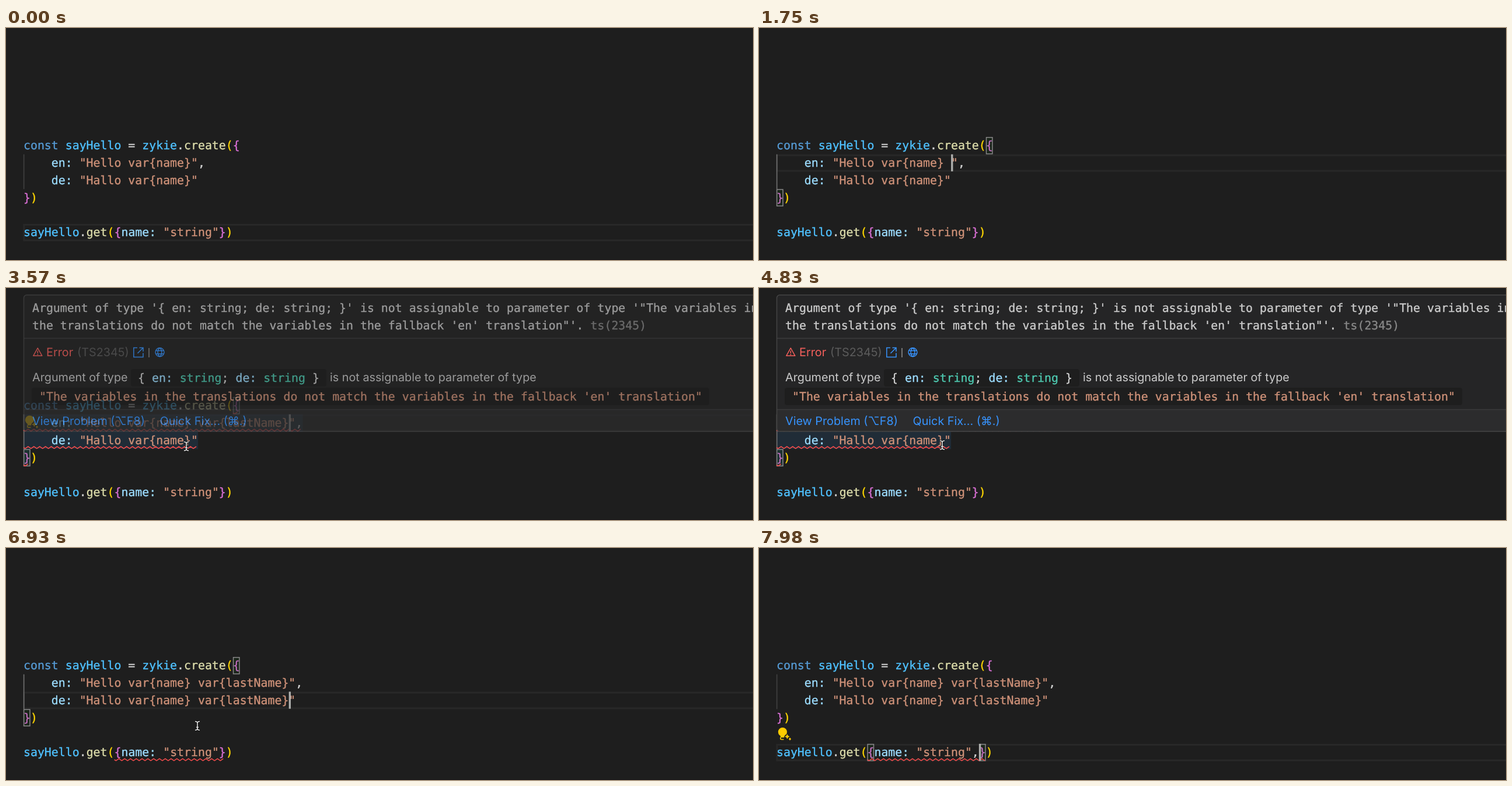
Recreate the animation shown at these times as an HTML page. Size 1280 by 398 pixels, loop 8000 ms.

```html
<!DOCTYPE html>
<html lang="en">
<head>
<meta charset="utf-8">
<title>Typed translations</title>
<style>
  html, body { margin: 0; width: 100%; height: 100%; overflow: hidden; background: #1e1e1e; }
  svg { display: block; width: 1280px; height: 398px; }
  text { white-space: pre; text-rendering: geometricPrecision; }
  .mono { font: 19.875px "DejaVu Sans Mono", monospace; stroke-width: 0.35px; }
  .sans { font: 19.8px Inter, sans-serif; stroke-width: 0; }
</style>
</head>
<body>
<svg id="stage" viewBox="0 0 1280 398"></svg>
<script>
const LOOP = 8000, STEP = 70, BLINK = 490;
const LEFT = 30, TOP = 186.9, CHAR = 11.965, LINE = 29.8, PX = 1.656;
const C = {
  keyword: '#569cd6', name: '#4fc1ff', plain: '#d4d4d4', call: '#dcdcaa', paren: '#ffd700',
  brace: '#da70d6', key: '#9cdcfe', string: '#ce9178', type: '#4ec9b0', soft: '#cccccc',
  error: '#f14c4c', link: '#3794ff', bulb: '#ffcc00'
};
const LAST = ' var{lastName}';

// [time, line, column]
const carets = [
  [840, 1, 24], [1750, 1, 25], [2520, 1, 38], [5320, 2, 24],
  [5880, 2, 25], [5950, 2, 38], [7420, 5, 28], [7980, 5, 29]
];
// pointer paths of [time, x, y]; each is visible from its first time until "end"
const pointers = [
  { end: 1400, path: [[70, 436, 350], [420, 385, 290], [770, 324, 238], [910, 324, 238], [1050, 349, 246]] },
  { end: 4830, path: [[2940, 334, 262], [3220, 309, 271.5]] },
  { end: 5880, path: [[4830, 314, 269.5], [5180, 322, 265]] },
  { end: 7980, path: [[6440, 296, 268], [6580, 296, 268], [6930, 328, 305], [7350, 366, 351.5]] }
];

const colX = col => LEFT + col * CHAR;
const lineY = line => TOP + line * LINE;
const within = (t, from, to) => t >= from && t < to;

const rect = (x, y, w, h, fill, extra = '') =>
  `<rect x="${x}" y="${y}" width="${w}" height="${h}" fill="${fill}" ${extra}/>`;
const path = (d, stroke, width = PX, extra = '') =>
  `<path d="${d}" fill="none" stroke="${stroke}" stroke-width="${width}" ${extra}/>`;

// parts: colour, text, colour, text ...
function text(x, y, parts, font = 'mono') {
  let spans = '';
  for (let i = 0; i < parts.length; i += 2)
    spans += `<tspan fill="${parts[i]}" stroke="${parts[i]}">${parts[i + 1]}</tspan>`;
  return `<text class="${font}" x="${x}" y="${y}">${spans}</text>`;
}

const codeLine = (line, ...parts) => text(LEFT, lineY(line) + 21.4, parts);

function squiggle(line, from, to) {
  const x0 = colX(from), x1 = colX(to), low = lineY(line) + LINE - 0.9, high = low - 3.4;
  let d = `M${x0} ${(low + high) / 2}`;
  for (let i = 0, x = x0 + 1.75 * PX; x <= x1; i++, x += 3 * PX) d += `L${x} ${i % 2 ? high : low}`;
  return path(d, C.error, 1.6);
}

const shade = (line, from, to) =>
  rect(colX(from), lineY(line), (to - from) * CHAR, LINE, 'rgba(38,79,120,.28)');

const bracketBox = (line, col) =>
  rect(colX(col) + 0.6, lineY(line) + 0.8, CHAR - 1.6, LINE - 1.6, 'rgba(0,100,0,.1)',
    'stroke="#888888" stroke-width="1.5"');

function star(x, y, r) {
  const k = r * 0.28;
  return `<path fill="${C.bulb}" d="M${x} ${y - r}L${x + k} ${y - k}L${x + r} ${y}L${x + k} ${y + k}` +
    `L${x} ${y + r}L${x - k} ${y + k}L${x - r} ${y}L${x - k} ${y - k}Z" stroke="${C.bulb}" ` +
    `stroke-width="1" stroke-linejoin="round"/>`;
}

const sparkles = line => star(40, lineY(line) + 10.5, 8.5) + star(50, lineY(line) + 19.5, 4.5);

function bulb(line) {
  const y = lineY(line);
  return `<circle cx="40.4" cy="${y + 9.6}" r="7.6" fill="${C.bulb}"/>` +
    rect(36.8, y + 14, 6.6, 5, C.bulb) +
    path(`M36.8 ${y + 19}v2q0 1.4 1.6 1.4h4`, C.bulb) +
    `<circle cx="49" cy="${y + 18.6}" r="5.6" fill="#1e1e1e"/>` +
    star(48.4, y + 17.4, 3.6) + star(53, y + 21.6, 2);
}

function codeView(t, caret) {
  const line = caret ? caret[1] : 5;
  const inBlock = line < 3;
  const enTail = t < 1750 ? '' : t < 2520 ? ' ' : LAST;
  const deTail = t < 5880 ? '' : t < 5950 ? ' ' : LAST;
  const comma = t >= 7980 ? ',' : '';
  const enEnd = 26 + enTail.length, deEnd = 25 + deTail.length, argEnd = 29 + comma.length;
  const blockRanges = [[0, 30, 31], [1, 0, enEnd], [2, 0, deEnd], [3, 0, 1]];
  const argRange = [5, 13, argEnd];
  const draw = (ranges, shape) => ranges.map(r => shape(...r)).join('');

  let out = rect(LEFT + 0.8, lineY(line) + 1.6, 1260, LINE - 3, 'none', 'stroke="#282828" stroke-width="3"');
  if (within(t, 3570, 5110)) out += draw(blockRanges, shade);
  if (within(t, 7700, 7980)) out += draw([argRange], shade);
  out += rect(29.8, lineY(1), PX, LINE * 2, inBlock ? '#707070' : '#404040');

  out += codeLine(0, C.keyword, 'const ', C.name, 'sayHello', C.plain, ' = ', C.name, 'zykie',
    C.plain, '.', C.call, 'create', C.paren, '(', C.brace, '{');
  out += codeLine(1, C.key, '    en: ', C.string, `"Hello var{name}${enTail}"`, C.plain, ',');
  out += codeLine(2, C.key, '    de: ', C.string, `"Hallo var{name}${deTail}"`);
  out += codeLine(3, C.brace, '}', C.paren, ')');
  out += codeLine(5, C.name, 'sayHello', C.plain, '.', C.call, 'get', C.paren, '(', C.brace, '{',
    C.key, 'name: ', C.string, '"string"', C.plain, comma, C.brace, '}', C.paren, ')');

  if (caret) out += draw(inBlock ? [[0, 30], [3, 0]] : [[5, 13], [5, argEnd - 1]], bracketBox);
  if (within(t, 2870, 6300)) out += draw(blockRanges, squiggle);
  if (t >= 6300) out += draw([argRange], squiggle);

  if (within(t, 2870, 5320)) out += bulb(1);
  if (within(t, 5600, 6300)) out += sparkles(2);
  if (t >= 7700) out += bulb(4);

  if (caret && (t - caret[0]) % (2 * BLINK) < BLINK)
    out += rect(colX(caret[2]), lineY(line), 2 * PX, LINE - 0.6, '#aeafad');
  return out;
}

function hover(opacity) {
  const message = '"The variables in the translations do not match the variables in the fallback \'en\' translation"';
  const split = message.indexOf(' the translations');
  const dim = '#5c5c5c', grey = '#888888';
  return `<g opacity="${opacity}">` +
    rect(30.5, 12, 1300, 234, '#252526', 'rx="5"') +
    rect(31, 208.5, 1300, 37, '#2c2c2d') +
    path('M30 86.3H1280M30 208.5H1280', '#3a3a3b') +
    rect(30.5, 12, 1300, 234, 'none', 'rx="5" stroke="#454545" stroke-width="1.5"') +
    text(45, 41, [C.soft, `Argument of type '{ en: string; de: string; }' is not assignable to parameter of type '${message.slice(0, split)}`]) +
    text(45, 71, [C.soft, message.slice(split + 1) + "'. ", grey, 'ts(2345)']) +
    path('M54.3 103L61.8 116.3H46.8ZM54.3 107.5V112M54.3 113.2V115', '#f7605c', 1.5, 'stroke-linejoin="round"') +
    text(69, 117, ['#f7605c', 'Error'], 'sans') +
    text(122, 117, [dim, '(TS2345)'], 'sans') +
    path('M225 102.5H218.8V118.5H235V111.5M228.5 102.5H235V109M235 102.5L225.5 112', C.link, 1.5) +
    path('M245 103V119', grey) +
    path('M256 110.2a7.5 7.5 0 1 0 15 0a7.5 7.5 0 1 0 -15 0M263.5 102.7c-4.5 4-4.5 11 0 15c4.5-4 4.5-11 0-15M256.8 107.5H270.2M256.8 113H270.2', C.link, 1.4) +
    text(45, 160, [C.soft, 'Argument of type'], 'sans') +
    rect(214, 139, 335, 30, '#1e1e1e', 'rx="4"') +
    text(226, 161, [C.plain, '{ ', C.key, 'en: ', C.type, 'string', C.plain, '; ', C.key, 'de: ',
      C.type, 'string', C.plain, ' }']) +
    text(555, 160, [C.soft, 'is not assignable to parameter of type'], 'sans') +
    rect(44, 171, 1161, 30, '#1e1e1e', 'rx="4"') +
    text(57, 193, [C.string, message]) +
    text(45, 235, [C.link, 'View Problem (⌥F8)'], 'sans') +
    text(263.5, 235, [C.link, 'Quick Fix... (⌘.)'], 'sans') +
    '</g>';
}

function hoverOpacity(t) {
  if (!within(t, 3570, 5110)) return 0;
  return Math.min(1, 0.72 + (t - 3570) / 210 * 0.28);
}

function pointer(t) {
  const move = pointers.find(p => within(t, p.path[0][0], p.end));
  if (!move) return '';
  const next = move.path.findIndex(p => p[0] > t);
  let [, x, y] = move.path[move.path.length - 1];
  if (next > 0) {
    const a = move.path[next - 1], b = move.path[next], k = (t - a[0]) / (b[0] - a[0]);
    x = a[1] + (b[1] - a[1]) * k;
    y = a[2] + (b[2] - a[2]) * k;
  }
  const beam = `M${x - 4} ${y - 7.5}q4 0 4 3v9q0 3-4 3M${x + 4} ${y - 7.5}q-4 0-4 3v9q0 3 4 3M${x - 2} ${y + 2.5}h4`;
  return path(beam, '#111111', 3.6) + path(beam, '#e4e4e4', 1.6);
}

function scene(t) {
  const caret = carets.filter(c => c[0] <= t).pop();
  const opacity = hoverOpacity(t);
  return rect(0, 0, 1280, 398, '#1e1e1e') + codeView(t, caret) +
    (opacity ? hover(opacity) : '') + pointer(t) + rect(0, 397, 1280, 1, '#191617');
}

const stage = document.getElementById('stage');
const start = performance.now();
let shown = -1;

function tick() {
  const t = Math.floor((performance.now() - start) % LOOP / STEP) * STEP;
  if (t !== shown) {
    stage.innerHTML = scene(t);
    shown = t;
  }
  requestAnimationFrame(tick);
}
tick();
</script>
</body>
</html>
```
